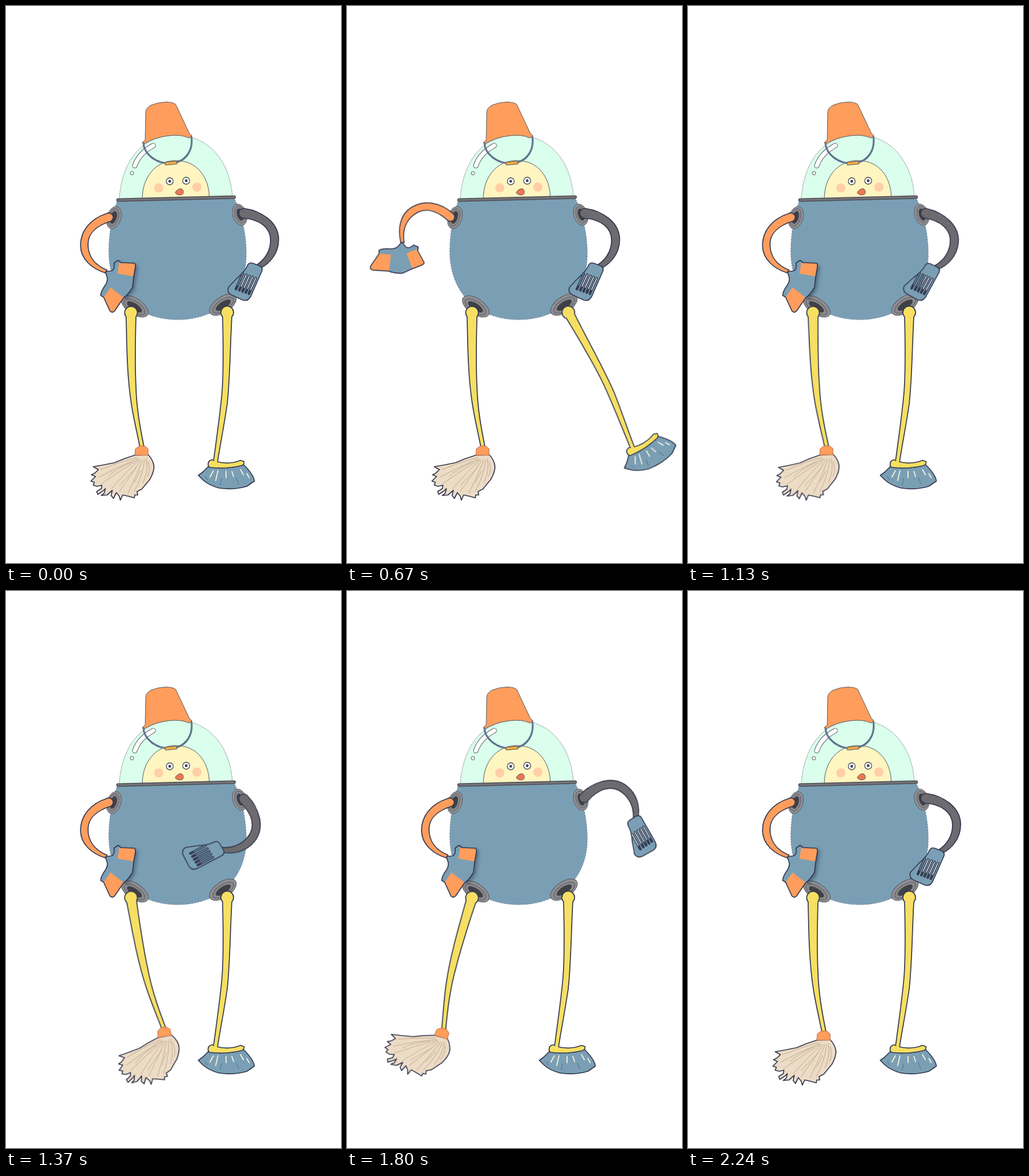
Animation of 580 by 966 pixels, one loop 2430 ms. Source, as an HTML page without scripts:

```html
<!DOCTYPE html>
<html lang="en">
<head>
<meta charset="utf-8">
<title>Dancing cleaning robot</title>
<style>
html, body { margin: 0; width: 100%; height: 100%; overflow: hidden; background: #fff; }
svg { display: block; width: 100%; height: 100%; }
.blue { fill: #7a9fb5; }
.orange { fill: #ff9d5c; }
.yellow { fill: #f6df62; }
.ink { stroke: #34384e; stroke-width: 1.7; stroke-linejoin: round; }
.thin { stroke: #555860; stroke-width: 1; stroke-linejoin: round; }
.line { fill: none; stroke-linecap: round; }

/* every limb holds each pose for a thirtieth of a second */
.move { animation: 2430ms -4ms infinite; }
.arm-l { transform-origin: 179px 367px; animation-name: arm-l; }
.arm-r { transform-origin: 410px 360px; animation-name: arm-r; }
.leg-l { transform-origin: 216px 532px; animation-name: leg-l; }
.leg-r { transform-origin: 383px 531px; animation-name: leg-r; }
.trace { animation-name: trace; animation-timing-function: step-end; }

@keyframes arm-l {
  0% { transform: rotate(0deg); animation-timing-function: steps(11); }
  15.09% { transform: rotate(-52.9deg); animation-timing-function: steps(9); }
  27.435% { transform: rotate(59deg); animation-timing-function: steps(13); }
  45.267%, 100% { transform: rotate(0deg); }
}
@keyframes leg-r {
  0% { transform: rotate(0deg); animation-timing-function: steps(11); }
  15.09% { transform: rotate(13.5deg); animation-timing-function: steps(9); }
  27.435% { transform: rotate(-29.8deg); animation-timing-function: steps(13); }
  45.267%, 100% { transform: rotate(0deg); }
}
@keyframes arm-r {
  0% { transform: rotate(0deg); }
  45.267% { transform: rotate(0deg); animation-timing-function: steps(10); }
  58.985% { transform: rotate(48deg); animation-timing-function: steps(14); }
  78.189% { transform: rotate(-81deg); animation-timing-function: steps(10); }
  91.907%, 100% { transform: rotate(0deg); }
}
@keyframes leg-l {
  0% { transform: rotate(0deg); }
  45.267% { transform: rotate(0deg); animation-timing-function: steps(13); }
  63.1% { transform: rotate(-15.3deg); animation-timing-function: steps(11); }
  78.189% { transform: rotate(28.8deg); animation-timing-function: steps(10); }
  91.907%, 100% { transform: rotate(0deg); }
}
@keyframes trace {
  0% { opacity: 0; }
  1.372% { opacity: 1; }
  20.576%, 100% { opacity: 0; }
}
</style>
</head>
<body>
<svg viewBox="0 0 580 966" xmlns="http://www.w3.org/2000/svg">
  <defs>
    <path id="body" d="M193 337L395 333C409 362 416 398 416 430C416 500 366 544 297 544C228 544 178 500 178 425C178 395 184 362 193 337Z"/>
    <clipPath id="on-body"><use href="#body"/></clipPath>
    <filter id="soft" x="-30%" y="-30%" width="160%" height="160%"><feGaussianBlur stdDeviation="3"/></filter>
    <path id="glove" d="M172 461L184 459Q189 455 187 446L194 441L199 445L222 446Q225 447 224 453L221 470L219 488Q212 500 203 507L188 529Q184 533 180 529L169 505L164 502Q164 495 172 484Q177 476 175 470Z"/>
    <path id="arm-left" d="M174 360C146 369 129 390 129 415C129 440 150 456 172 463L175 458C155 450 142 435 142 413C142 395 156 381 182 373A7.5 7.5 0 1 0 174 360Z"/>
    <path id="slots" d="M410 464l-12 27M416 466l-12 27M421.500 468l-12 27M427 470l-12 27M432.500 472l-12 27"/>
    <mask id="holes" maskUnits="userSpaceOnUse" x="370" y="430" width="90" height="95">
      <path fill="#fff" d="M370 430h90v95h-90z"/>
      <use href="#slots" class="line" stroke="#000" stroke-width="1.3" stroke-dasharray="22 9"/>
    </mask>
    <clipPath id="edge"><path d="M126 397h7v35h-7z"/></clipPath>
    <g id="socket">
      <ellipse rx="26.500" ry="13.500" fill="#8f8f92" class="thin"/>
      <ellipse cy="1" rx="21" ry="9.500" fill="#88888b" class="thin"/>
      <ellipse cy="1" rx="15" ry="6" fill="#404047"/>
    </g>
    <g id="eye">
      <circle r="6" fill="#fff" stroke="#4a4b50" stroke-width="1.3"/>
      <circle r="2.400" fill="#3a4560"/>
    </g>
  </defs>

  <use href="#body" class="blue" stroke="#65718f" stroke-width=".8" stroke-dasharray="3 2"/>

  <!-- dome and passenger -->
  <path d="M196 336C200 270 234 224 294 224C350 224 388 268 392 331Z" fill="#daffec" stroke="#777a80" stroke-width=".8" stroke-dasharray="3 1"/>
  <path d="M236 334C236 298 258 268 294 268C332 268 351 298 352 331Z" fill="#fff5c1" class="thin"/>
  <g fill="#ffcfa8"><circle cx="264.500" cy="315.500" r="8"/><circle cx="330.500" cy="314" r="8"/></g>
  <use href="#eye" x="283.500" y="304"/>
  <use href="#eye" x="312" y="303"/>
  <path d="M293 324C294 320 300 316 304 317C307 319 308 323 306 326C302 329 296 328 293 324Z" fill="#ec7751" class="thin"/>
  <path d="M223 277C228 262 240 250 255 242" class="line" stroke="#5c6068" stroke-width="9"/>
  <path d="M223 277C228 262 240 250 255 242" class="line" stroke="#fff" stroke-width="7"/>
  <circle cx="218" cy="290" r="3" fill="#fff" class="thin"/>
  <path d="M194 336.500L395 331.500" class="line" stroke="#46464c" stroke-width="6"/>
  <path d="M194 336.500L395 331.500" class="line" stroke="#737378" stroke-width="3.600"/>

  <!-- bucket hat -->
  <path d="M242 184Q242 177 251 172Q263 167 277 166.500Q291 167 294 171L317.500 221L322 225L317 229Q302 222 281 225Q257 228 239 239L236 237L241 232Z" class="orange thin"/>
  <path d="M238 238C239 256 259 273 283 273C312 272 324 250 321 227" class="line" stroke="#485a78" stroke-width="3"/>
  <path d="M238 238C239 256 259 273 283 273C312 272 324 250 321 227" class="line" stroke="#8499b5" stroke-width="1"/>
  <path d="M275 271l20-2 1 5-20 2z" fill="#f7ad42" class="thin"/>

  <use href="#socket" transform="translate(187 367) rotate(107) scale(.75 .9)"/>
  <use href="#socket" transform="translate(404.500 362) rotate(-107) scale(.72 .9)"/>
  <use href="#socket" transform="translate(223 521) rotate(34)"/>
  <use href="#socket" transform="translate(375.500 518) rotate(-34)"/>

  <!-- mop leg -->
  <g class="move leg-l">
    <path d="M208 539C209 580 209 640 217 690C221 716 228 745 232 766L239 765C233 735 226 700 225 660C223 620 224 575 225 539A11 11 0 1 0 208 539Z" class="yellow ink"/>
    <path d="M223 779L205 785L188 792L168 796L151 799L160 804L154 810L148 813L155 816L147 824L153 826L151 831L158 833L166 831L165 837L157 842L159 847L168 841L172 837L170 845L165 849L175 848L184 840L182 849L186 854L191 844L196 850L198 857L202 848L211 850L222 853L223 848L228 848L227 842L235 838L249 821Q257 807 256 797Q254 786 246 778Z" fill="#ecdbc5" class="ink"/>
    <path d="M226 783Q196 791 164 804M228 785Q194 799 161 817M230 786Q197 806 166 828M231 787Q208 808 183 837M234 787Q216 815 196 842M237 787Q225 817 211 845M240 787Q237 815 222 842M243 785Q247 807 237 827M218 791Q188 804 177 816M225 802Q205 822 196 832M233 806L222 827M246 790Q251 805 245 816" class="line" stroke="#b9a38a" stroke-width=".9"/>
    <path d="M223 779L224 768L231 763L240 763L246 768L246 779Z" class="orange" stroke="#b9694a"/>
  </g>

  <!-- broom leg -->
  <g class="move leg-r">
    <path d="M375 539C376 580 377 630 374 670C370 715 363 760 359 792L366 792C371 760 378 725 383 690C388 645 388 590 391 539A11 11 0 1 0 375 539Z" class="yellow ink"/>
    <path d="M351 798L341 808L333 814L340 821Q350 831 369 836Q393 840 417 833L430 824Q429 813 411 795Q384 805 351 798Z" class="blue ink"/>
    <path d="M359 806l-6 11M367 806l-4 17M381 807l0 11M391 807l3 9M406 804l5 9M417 811l4 7" class="line" stroke="#f7f0dc" stroke-width="1.800"/>
    <path d="M345 816l4 6M373 820l-2 11M399 819l4 10" class="line" stroke="#516f8a"/>
    <path d="M350 797Q349 788 357 787L364 790Q386 796 406 788L412 790Q413 795 408 797Q378 804 352 800Z" class="yellow ink"/>
    <path d="M360.500 785h5v7h-5z" class="yellow"/>
  </g>

  <!-- glove arm -->
  <g clip-path="url(#on-body)">
    <g class="move arm-l"><use href="#glove" x="4" y="3" fill="#26384c" opacity=".5" filter="url(#soft)"/></g>
  </g>
  <g class="move trace"><use href="#arm-left" class="orange ink" clip-path="url(#edge)"/></g>
  <g class="move arm-l">
    <use href="#arm-left" class="orange ink"/>
    <use href="#glove" class="blue"/>
    <path d="M196 445L224 446L221 469L193 464ZM181 488L204 506L187 530L180 529L169 505Z" class="orange"/>
    <use href="#glove" fill="none" class="ink"/>
  </g>

  <!-- spatula arm -->
  <g class="move arm-r">
    <path d="M412 351C442 355 472 375 472 405C472 430 456 447 440 455L434 449C448 440 458 425 458 406C458 385 440 370 411 368A8.500 8.500 0 0 1 412 351Z" fill="#6d6b70" class="ink"/>
    <g mask="url(#holes)">
      <path d="M418 450Q421 444 427 446L440 451Q446 455 442 462L424 503Q419 513 410 510L390 501Q382 497 385 488L400 472Q414 460 418 450Z" class="blue ink"/>
      <use href="#slots" class="line" stroke="#343b50" stroke-width="4.400"/>
    </g>
  </g>
</svg>
</body>
</html>
```
